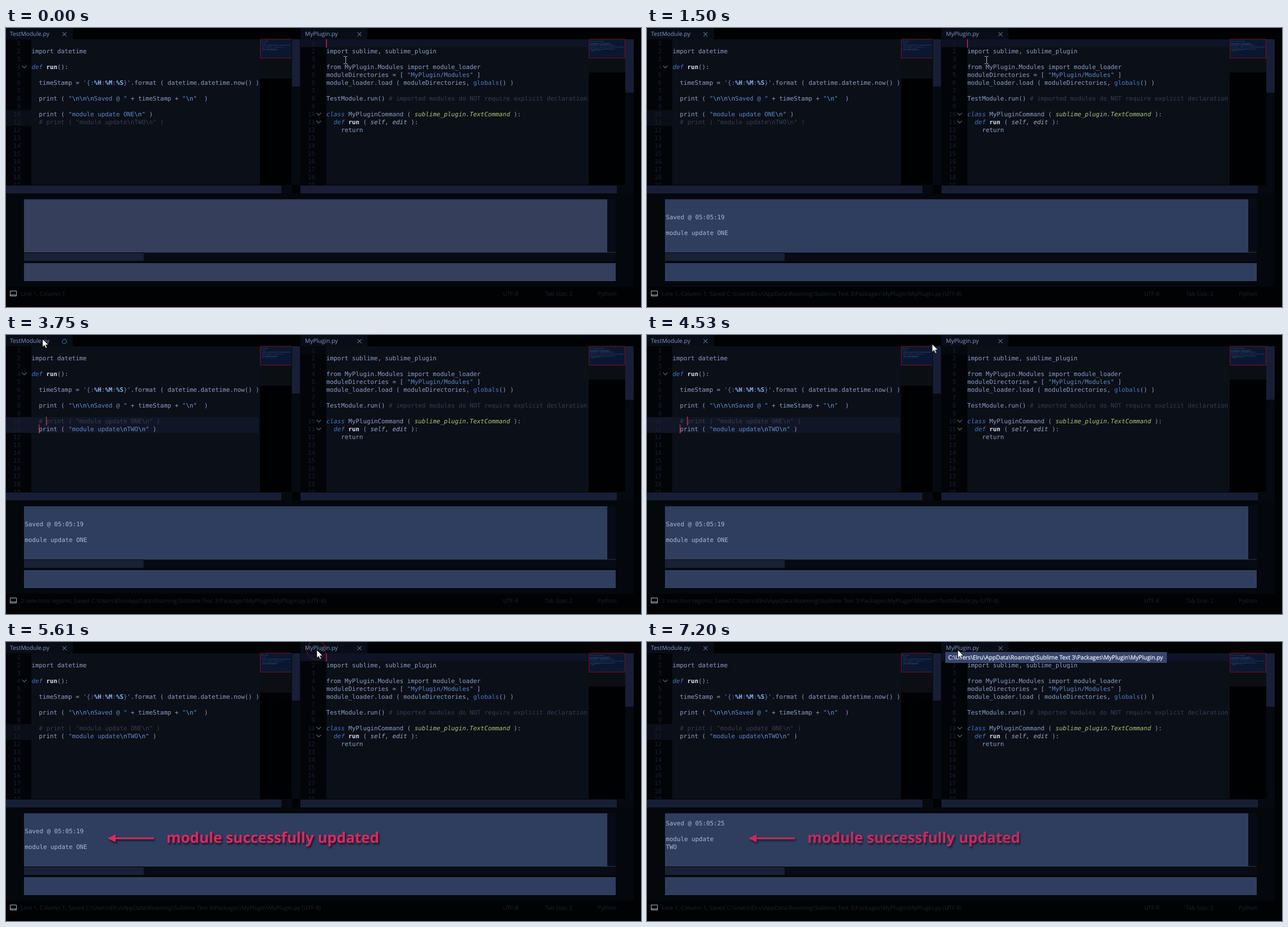
These frames come from a looping animation (1130 px wide and 496 px high, 7290 ms). An HTML page:

```html
<!DOCTYPE html>
<html lang="en">
<head>
<meta charset="utf-8">
<title>Module reload demo</title>
<style>
html, body { margin: 0; width: 100%; height: 100%; overflow: hidden; background: #010204; }
body { position: relative; text-rendering: geometricPrecision; }
svg { position: absolute; left: 0; top: 0; width: 1130px; height: 496px; }
svg text { font: 10.2px "Open Sans", sans-serif; white-space: pre; }
pre {
  position: absolute; margin: 0; white-space: pre; color: #8b9fc6;
  font: 10.86px/14px "DejaVu Sans Mono", monospace;
}
.nums { top: 21px; width: 26px; height: 258px; overflow: hidden; text-align: right; color: #182131; }
.left { left: 45.5px; }
.right { left: 570px; }
.top { top: 21px; }
.low { top: 147px; }
.log { left: 33.5px; color: #a8b8d4; }
.k { color: #4475c8; font-style: italic; }
.f { color: #d6def0; font-weight: bold; }
.s { color: #5f86c6; }
.e { color: #68a0e6; }
.h { color: #86b2ee; font-weight: bold; }
.c { color: #333d55; }
.t { color: #a8c478; font-style: italic; }
.p { color: #98acd2; font-style: italic; }
.g { color: #4a77c6; }
.status { fill: #1c2532; }
.tab { fill: #8298c4; }
.caret { fill: #b4284c; }
.callout { filter: drop-shadow(2px 3px 1.5px #0009); }
svg .callout text { font-size: 26.15px; font-weight: bold; }
.ring { fill: none; stroke: #a01c34; stroke-width: 1.3; vector-effect: non-scaling-stroke; opacity: 0; }

.step { animation: 7290ms step-end infinite; }
.flow { animation: 7290ms linear infinite; }

#leftLine { animation-name: leftOn; }
#rightLine { animation-name: rightOn; }
#oldLines, #oldMap { animation-name: until; }
#newLines, #newMap { animation-name: after; }
#dirty { animation-name: dirtyOn; }
#cross { animation-name: crossOn; }
#caretR { animation-name: caretR; }
#caretOld { animation-name: caretOld; }
#caretNew { animation-name: caretNew; }
#log1 { animation-name: log1; }
#log2 { animation-name: log2; }
#st1 { animation-name: st1; }
#st2 { animation-name: st2; }
#st3 { animation-name: st3; }
#st4 { animation-name: st4; }
#st5 { animation-name: st5; }
#cursor { animation-name: travel; }
#beam { animation-name: beamOn; }
#arrow { animation-name: arrowOn; }
#ringL { animation-name: ringL; }
#ringR { animation-name: ringR; }
#tip { animation-name: tipIn; }
#callout { animation-name: calloutIn; }
#console { animation-name: tint; }

@keyframes leftOn { 0% { opacity: 0 } 33.33% { opacity: 1 } 67.49%, 100% { opacity: 0 } }
@keyframes rightOn { 0% { opacity: 1 } 33.33% { opacity: 0 } 67.49%, 100% { opacity: 1 } }
@keyframes until { 0% { opacity: 1 } 45.27%, 100% { opacity: 0 } }
@keyframes after { 0% { opacity: 0 } 45.27%, 100% { opacity: 1 } }
@keyframes dirtyOn { 0% { opacity: 0 } 45.27% { opacity: 1 } 53.09%, 100% { opacity: 0 } }
@keyframes crossOn { 0% { opacity: 1 } 45.27% { opacity: 0 } 53.09%, 100% { opacity: 1 } }
@keyframes caretR {
  0% { opacity: 1 } 7.4% { opacity: 0 } 13.17% { opacity: 1 } 22.2% { opacity: 0 }
  29.2% { opacity: 1 } 33.33% { opacity: 0 } 67.49%, 100% { opacity: 1 }
}
@keyframes caretOld { 0% { opacity: 0 } 33.33% { opacity: 1 } 40.6%, 100% { opacity: 0 } }
@keyframes caretNew {
  0% { opacity: 0 } 45.27% { opacity: 1 } 52.5% { opacity: 0 }
  59.8% { opacity: 1 } 67.49%, 100% { opacity: 0 }
}
@keyframes log1 { 0% { opacity: 0 } 15.23% { opacity: 1 } 77.35%, 100% { opacity: 0 } }
@keyframes log2 { 0% { opacity: 0 } 77.35%, 100% { opacity: 1 } }
@keyframes st1 { 0% { opacity: 1 } 13.17%, 100% { opacity: 0 } }
@keyframes st2 {
  0% { opacity: 0 } 13.17% { opacity: 1 } 33.33% { opacity: 0 } 75.3%, 100% { opacity: 1 }
}
@keyframes st3 { 0% { opacity: 0 } 33.33% { opacity: 1 } 53.09%, 100% { opacity: 0 } }
@keyframes st4 { 0% { opacity: 0 } 53.09% { opacity: 1 } 67.49%, 100% { opacity: 0 } }
@keyframes st5 { 0% { opacity: 0 } 67.49% { opacity: 1 } 75.3%, 100% { opacity: 0 } }
@keyframes travel {
  0%, 22.2% { transform: translate(604px, 57px) }
  27.98%, 29.2% { transform: translate(209px, 21px) }
  30.86% { transform: translate(79px, 9px) }
  32.9% { transform: translate(65px, 7px) }
  55.97% { transform: translate(65px, 7px); animation-timing-function: ease-in }
  62.14% { transform: translate(507px, 16px); animation-timing-function: ease-out }
  65.02%, 100% { transform: translate(553px, 14px) }
}
@keyframes beamOn { 0% { opacity: 1 } 22.6% { opacity: 0 } 24.4% { opacity: 1 } 27.9%, 100% { opacity: 0 } }
@keyframes arrowOn { 0% { opacity: 0 } 22.6% { opacity: 1 } 24.4% { opacity: 0 } 27.9%, 100% { opacity: 1 } }
@keyframes ringL {
  0%, 34.56% { transform: scale(0); opacity: 0 }
  34.57% { transform: scale(0); opacity: .8 }
  44.85% { transform: scale(1); opacity: .45 }
  44.86%, 100% { transform: scale(1); opacity: 0 }
}
@keyframes ringR {
  0%, 69.13% { transform: scale(0); opacity: 0 }
  69.14% { transform: scale(0); opacity: .8 }
  79.41% { transform: scale(1); opacity: .45 }
  79.42%, 100% { transform: scale(1); opacity: 0 }
}
@keyframes tipIn { 0%, 82.2% { opacity: 0 } 85.6%, 100% { opacity: 1 } }
@keyframes calloutIn {
  0%, 72.02% { opacity: 0 } 76.1%, 98.2% { opacity: 1 }
  98.35% { opacity: .93 } 98.76%, 100% { opacity: .86 }
}
@keyframes tint { 0%, .41% { fill: #353e5a } 4.12%, 100% { fill: #2f3d5f } }
</style>
</head>
<body>
<svg viewBox="0 0 1130 496">
  <!-- tabs, editors -->
  <path fill="#080d17" d="M0 0h119v20H0zM524 0h119v20H524z"/>
  <path fill="#0b0f17" d="M45 20h407v259H45zM570 20h467v259H570z"/>
  <path fill="#020408" d="M0 20h45v259H0zM524 20h46v259H524z"/>
  <path fill="#0a0e18" d="M0 146h45v28H0z"/>
  <path fill="#05080e" d="M524 20h46v14H524z"/>
  <path id="leftLine" class="step" fill="#111626" d="M0 146h450v28H0z"/>
  <path id="rightLine" class="step" fill="#10152a" fill-opacity=".8" d="M524 20h513v14H524z"/>

  <!-- minimaps -->
  <path fill="#000103" d="M452 90h56v189H452zM1037 79h65v200H1037z"/>
  <path fill="#0b0f14" d="M452 53h56v37H452zM1037 53h65v26H1037z"/>
  <path fill="#0b1730" stroke="#76122c" d="M452.5 20h56v33.5h-56zM1037.5 20h64v33.5h-64z"/>
  <g id="maps" fill="none" stroke="#35507f" stroke-opacity=".65"></g>

  <!-- scrollbars -->
  <path fill="#060910" d="M508 20h16v259H508zM1102 20h15v259H1102zM490 279h19v15H490zM1087 279h30v15H1087z"/>
  <path fill="#181e35" d="M509 20h14v84H509zM1102 20h15v95H1102zM0 280h490v14H0zM524 280h563v14H524z"/>

  <!-- console -->
  <path fill="#04070c" d="M0 294h1117v166H0z"/>
  <path fill="#070b13" d="M1070 304h15v95H1070zM245 399h840v15H245z"/>
  <path fill="#192136" d="M32 400h213v14H32z"/>
  <path fill="#202839" d="M245 398h840v1.5H245z"/>
  <path id="console" class="flow" fill="#2f3d5f" d="M32 304.500h1038v94.500H32zM32 418h1053v32H32z"/>

  <!-- folding, close buttons, panel switch -->
  <g fill="none" stroke="#56637c" stroke-width="1.200">
    <path d="M28.500 67l4 4 4-4M552.500 151l4 4 4-4M552.500 165l4 4 4-4"/>
    <path id="cross" class="step" d="M100.500 7.500l7 7m0-7l-7 7"/>
    <path d="M625.500 7.500l7 7m0-7l-7 7"/>
    <circle id="dirty" class="step" cx="104" cy="11.500" r="3.800" stroke="#2673a2"/>
  </g>
  <path fill="none" stroke="#aeb6c2" d="M7.500 467.500h11v9h-11zM8 474.500h10"/>

  <text class="tab" x="7" y="14" style="font-size:10.350px">TestModule.py</text>
  <text class="tab" x="532" y="14" style="font-size:10.350px">MyPlugin.py</text>
  <g class="status">
    <text id="st1" class="step" x="26.500" y="475.500"></text>
    <text id="st2" class="step" x="26.500" y="475.500"></text>
    <text id="st3" class="step" x="26.500" y="475.500"></text>
    <text id="st4" class="step" x="26.500" y="475.500"></text>
    <text id="st5" class="step" x="26.500" y="475.500"></text>
    <text x="884.500" y="475.500">UTF-8</text>
    <text x="959" y="475.500">Tab Size: 2</text>
    <text x="1053" y="475.500">Python</text>
  </g>
</svg>

<pre class="nums" style="left:0"></pre>
<pre class="nums" style="left:524px"></pre>

<pre class="left top" id="codeL">

import datetime

<span class="k">def</span> <span class="f">run</span>():

  timeStamp = <span class="s">'{:<span class="h">%H</span>:<span class="h">%M</span>:<span class="h">%S</span>}'</span>.format ( datetime.datetime.now() )

  print ( <span class="s">"<span class="e">\n\n\n</span>Saved @ "</span> + timeStamp + <span class="s">"<span class="e">\n</span>"</span>  )
</pre>
<pre class="left low step" id="oldLines">  print ( <span class="s">"module update ONE<span class="e">\n</span>"</span> )
<span class="c">  # print ( "module update\nTWO\n" )</span></pre>
<pre class="left low step" id="newLines"><span class="c">  # print ( "module update ONE\n" )</span>
  print ( <span class="s">"module update<span class="e">\n</span>TWO<span class="e">\n</span>"</span> )</pre>

<pre class="right top" id="codeR">

import sublime, sublime_plugin

from MyPlugin.Modules import module_loader
moduleDirectories = [ <span class="s">"MyPlugin/Modules"</span> ]
module_loader.load ( moduleDirectories, <span class="g">globals</span>() )

TestModule.run() <span class="c"># imported modules do NOT require explicit declaration</span>

<span class="k">class</span> MyPluginCommand ( <span class="t">sublime_plugin.TextCommand</span> ):
  <span class="k">def</span> <span class="f">run</span> ( <span class="p">self, edit</span> ):
    return
</pre>

<pre class="log step" id="log1" style="top:330px">Saved @ 05:05:19

module update ONE</pre>
<pre class="log step" id="log2" style="top:316px">Saved @ 05:05:25

module update
TWO</pre>

<svg viewBox="0 0 1130 496">
  <path id="caretR" class="caret step" d="M569.500 20h1.600v15h-1.600z"/>
  <path id="caretOld" class="caret step" d="M58 145h1.600v16H58zM71 159h1.600v16H71z"/>
  <path id="caretNew" class="caret step" d="M71 145h1.600v16H71zM58 159h1.600v16H58z"/>

  <g id="callout" class="callout flow" fill="#e2265e">
    <path d="M181 349l14-7v5.500h68v3H195v5.500z"/>
    <text x="285.500" y="356.500">module successfully updated</text>
  </g>

  <g id="tip" class="flow">
    <path fill="#35456c" stroke="#3f4f78" d="M531.500 18.500h393v18h-393z"/>
    <text id="tipText" x="536" y="31" fill="#f0f4fb" stroke="#f0f4fb" stroke-width=".25"></text>
  </g>

  <g transform="translate(65 7)"><circle id="ringL" class="ring flow" r="22"/></g>
  <g transform="translate(552 14)"><circle id="ringR" class="ring flow" r="22"/></g>

  <g id="cursor" class="flow">
    <path id="beam" class="step" fill="none" stroke="#a9b3bd" d="M-3.500-6.500h2.500l1 1 1-1h2.500M.5-6v12M-3.500 6.500h2.500l1-1 1 1h2.500"/>
    <path id="arrow" class="step" fill="#fff" stroke="#000" stroke-width=".8" d="M0 0v14.500l3.400-3.200 2.300 5.300 2.400-1-2.300-5.200h4.600z"/>
  </g>
</svg>

<script>
const $ = id => document.getElementById(id);

const root = "C:\\Users\\Elru\\AppData\\Roaming\\Sublime Text 3\\Packages\\MyPlugin\\";
const plugin = root + "MyPlugin.py";
const module = root + "Modules\\TestModule.py";
const place = "Line 1, Column 1";
const regions = "2 selection regions";
const saved = (where, path) => `${where}; Saved ${path} (UTF-8)`;

[
  place,
  saved(place, plugin),
  saved(regions, plugin),
  saved(regions, module),
  saved(place, module)
].forEach((text, i) => $("st" + (i + 1)).textContent = text);
$("tipText").textContent = plugin;

const numbers = Array.from({ length: 19 }, (_, i) => i + 1).join("\n");
document.querySelectorAll(".nums").forEach(el => el.textContent = numbers);

// One dash per word gives the tiny overview of each file.
const mapTop = 22, mapRow = 1.7;
function addMap(source, x, firstRow, id) {
  const path = document.createElementNS("http://www.w3.org/2000/svg", "path");
  let d = "";
  source.textContent.split("\n").forEach((line, row) => {
    const y = mapTop + (firstRow + row) * mapRow;
    for (const word of line.matchAll(/\S+/g))
      d += `M${x + word.index * .85} ${y}h${word[0].length * .85}`;
  });
  path.setAttribute("d", d);
  if (id) {
    path.id = id;
    path.setAttribute("class", "step");
  }
  $("maps").append(path);
}
addMap($("codeL"), 454, 0);
addMap($("oldLines"), 454, 9, "oldMap");
addMap($("newLines"), 454, 9, "newMap");
addMap($("codeR"), 1039, 0);
</script>
</body>
</html>
```
